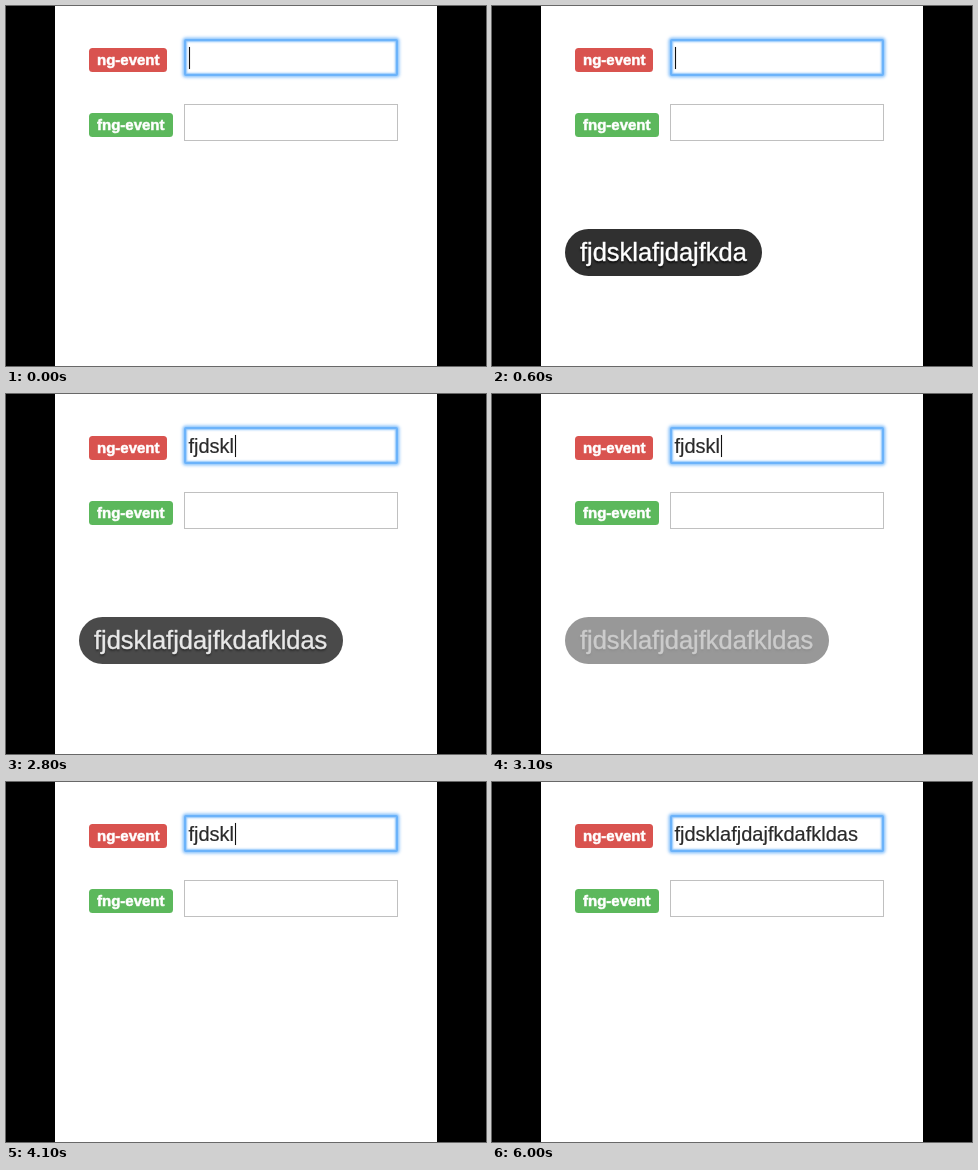
An HTML page for the animation above (6100 ms loop, 480x360 px).

```html
<!DOCTYPE html>
<html lang="en">
<head>
<meta charset="utf-8">
<title>Delayed typing</title>
<style>
  html, body { margin: 0; width: 100%; height: 100%; overflow: hidden; background: #000; }
  body { font-family: "Liberation Sans", Arial, sans-serif; }
  .stage { position: absolute; left: 0; top: 0; width: 480px; height: 360px; overflow: hidden; }
  .stage > * { position: absolute; box-sizing: border-box; white-space: pre; }

  .page { left: 49px; top: 0; width: 382px; height: 360px; background: #fff; }

  .label {
    left: 83px; height: 24px; padding: 0 8px; border-radius: 3.5px;
    font-weight: bold; font-size: 15px; line-height: 24px; color: #fff;
    -webkit-text-stroke: .5px #fff;
  }
  .red { top: 42px; width: 78px; background: #d9534f; }
  .green { top: 107px; width: 84px; background: #5cb85c; }

  .field { left: 178px; width: 214px; height: 37px; border: 1px solid #c0c0c0; background: #fff; }
  .first {
    top: 33px; border: 2px solid #6cb3fa; border-radius: 2px;
    box-shadow: 0 0 3px 1.5px rgba(110, 180, 250, .8), inset 0 0 2px 1px rgba(110, 180, 250, .8);
  }
  .second { top: 98px; }

  .entry {
    left: 182.5px; top: 40px; height: 24px; font-size: 20px; line-height: 24px; color: #2a2a2a;
    -webkit-text-stroke: .2px #2a2a2a;
  }
  .caret {
    display: inline-block; width: 1px; height: 22px; margin-left: .5px;
    vertical-align: -4px; background: #111; box-shadow: 0 0 1px rgba(0, 0, 0, .5);
    animation: blink 6.1s -20ms step-end infinite;
  }

  .pill {
    left: 73px; top: 223px; height: 47px; padding: 0 15.5px 0 15px; border-radius: 23.5px;
    background: #303030; color: #fff; font-size: 25.45px; line-height: 47px;
    -webkit-text-stroke: .4px #fff;
    text-shadow: 0 1.5px 2px rgba(0, 0, 0, .8);
  }
  /* pill and its text fade together, so the text dims faster */
  .pill, .keys { animation: fade 6.1s -20ms linear infinite; }

  @keyframes fade {
    0% { opacity: 1; }
    44.2623% { opacity: 1; animation-timing-function: steps(8, end); } /* 2700 ms */
    57.377%, 100% { opacity: 0; }                                      /* 3500 ms */
  }
  @keyframes blink {
    0%, 90.1639% { opacity: 1; }
    81.9672%, 98.3607%, 100% { opacity: 0; }
  }
</style>
</head>
<body>
<div class="stage">
  <div class="page"></div>
  <div class="label red">ng-event</div>
  <div class="label green">fng-event</div>
  <div class="field first"></div>
  <div class="field second"></div>
  <div class="entry"><span id="typed"></span><span class="caret"></span></div>
  <div class="pill" id="pill" style="visibility: hidden"><span class="keys" id="keys"></span></div>
</div>
<script>
  const LOOP = 6100, STEP = 100;
  const LEAD = 20; // same head start as the CSS animations
  const phrase = "fjdsklafjdajfkdafkldas";
  const [typed, pill, keys] = ["typed", "pill", "keys"].map(id => document.getElementById(id));
  let start;

  function setText(el, count) {
    const text = phrase.slice(0, count);
    if (el.textContent !== text) el.textContent = text;
  }

  function draw(now) {
    start ??= now;
    const t = (now - start + LEAD) % LOOP;
    const tick = Math.floor(t / STEP);
    // keys arrive three per tick; the blocked field catches up in two bursts
    const pressed = Math.max(0, tick * 3 - 2);
    setText(keys, pressed);
    pill.style.visibility = pressed === 0 || t >= 3500 ? "hidden" : "visible";
    setText(typed, t < 1100 ? 0 : t < 4500 ? 6 : phrase.length);
    requestAnimationFrame(draw);
  }
  requestAnimationFrame(draw);
</script>
</body>
</html>
```
